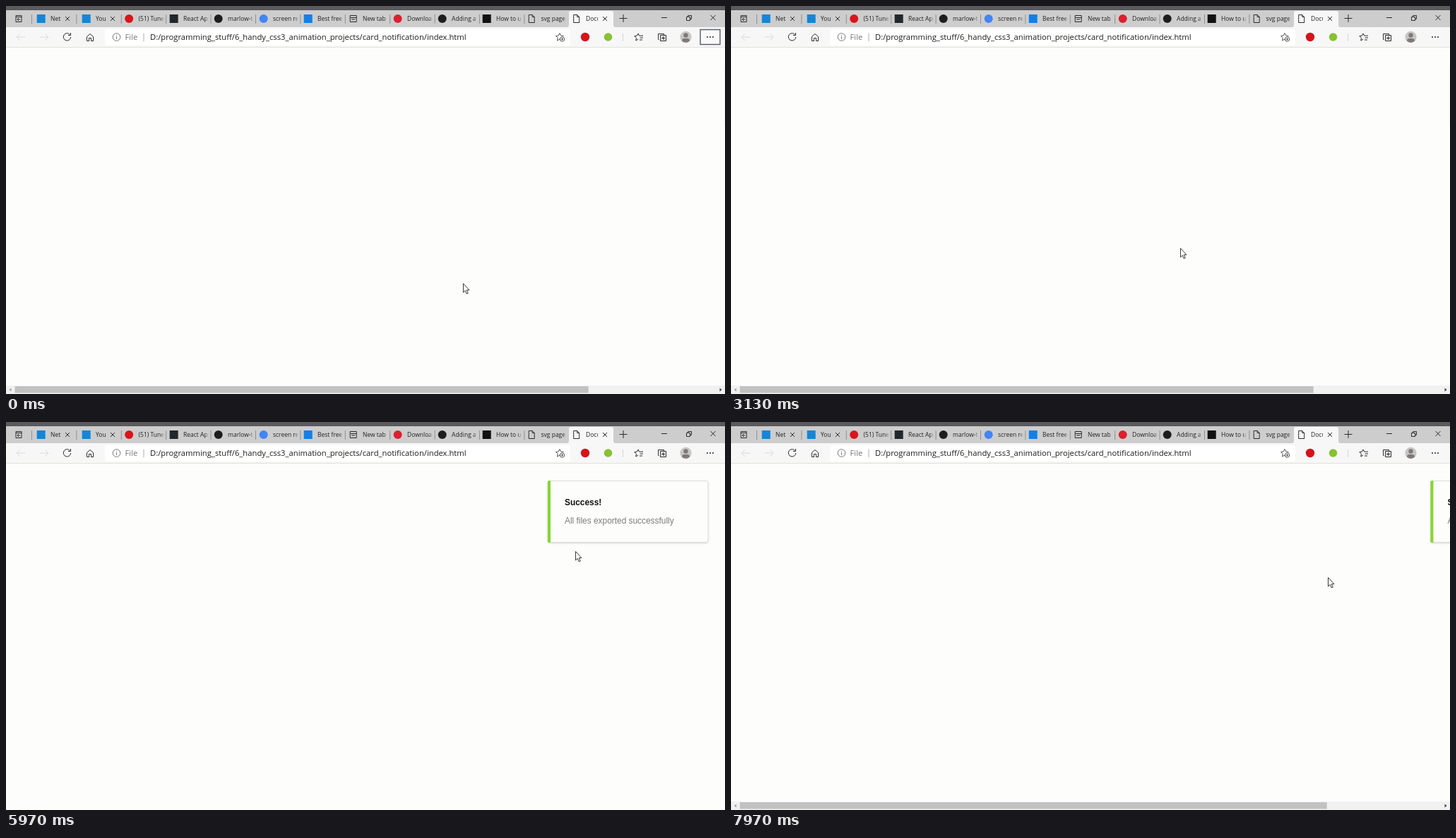
An HTML page for the animation above (8 s loop, 1018 by 550 pixels).

```html
<!DOCTYPE html>
<html lang="en">
<head>
<meta charset="utf-8">
<title>Card notification</title>
<style>
  html, body { margin: 0; width: 100%; height: 100%; overflow: hidden; background: #fdfdfc; }
  svg { display: block; }
  .ui { font: 11.24px "Open Sans", "Noto Sans", sans-serif; fill: #1c1c1c; }
  .tab { font-size: 8.5px; fill: #222; }
  .card { font: 11.9px "Liberation Sans", Arial, sans-serif; }
  .line { fill: none; stroke: #2b2b2b; stroke-width: 1; }
</style>
</head>
<body>
<svg id="stage" width="1018" height="550" viewBox="0 0 1018 550">
  <defs>
    <linearGradient id="fade">
      <stop offset="0" stop-color="#cdcdce" stop-opacity="0"/>
      <stop offset="1" stop-color="#cdcdce"/>
    </linearGradient>
    <filter id="shadow" x="-5%" y="-10%" width="110%" height="125%">
      <feDropShadow dx="0" dy="1" stdDeviation="1" flood-opacity=".16"/>
    </filter>
  </defs>
  <rect width="1018" height="550" fill="#fdfdfc"/>

  <g id="card" class="card">
    <rect x="767" y="83.5" width="227" height="87" rx="2.5" fill="#fdfdfc" stroke="#dcdcdc" filter="url(#shadow)"/>
    <path d="M771 83H769Q767 83 767 85V169Q767 171 769 171H771Z" fill="#84d72f"/>
    <text x="791" y="118" font-weight="bold" fill="#111">Success!</text>
    <text x="791" y="143.5" fill="#7c7c7c">All files exported successfully</text>
  </g>

  <g id="scrollbar">
    <rect y="538" width="1018" height="12" fill="#f1f1f1"/>
    <rect id="thumb" x="12.5" y="539" height="9.5" fill="#c1c1c1"/>
    <path d="M7.5 541.5V546.5L4.5 544Z" fill="#a0a0a0"/>
    <path d="M1010.5 541.5V546.5L1013.5 544Z" fill="#454545"/>
  </g>

  <g class="ui">
    <rect width="1018" height="31" fill="#cdcdce"/>
    <rect width="1018" height="6" fill="#5b595b"/>
    <rect y="30" width="1018" height="28" fill="#f7f7f7"/>
    <rect y="58" width="1018" height="1" fill="#e1e0d9"/>
    <path d="M794 30Q797 30 797 27V10Q797 7 800 7H857Q860 7 860 10V27Q860 30 863 30Z" fill="#f7f7f7"/>
    <path class="line" d="M14 13.5H22V22.5H14ZM14 15.5H22M16 19H20M18 17L16 19L18 21" stroke-width="1.3"/>
    <g id="tabs"></g>
    <path class="line" d="M868.5 17.5H879.5M874 12V23M928 16.5H936M963.5 15.5H968.5V20.5H963.5ZM965.5 15V13.5H970.5V18.5H969M997.5 13L1004.5 20M1004.5 13L997.5 20"/>

    <rect x="140" y="33" width="659" height="23" rx="3" fill="#fff"/>
    <rect id="reloadHover" x="72" y="33" width="29" height="23" rx="2" fill="#d9d9d9"/>
    <path class="line" style="stroke:#d8d8d8" d="M27 44H15M20 39L15 44L20 49M48 44H60M55 39L60 44L55 49"/>
    <path class="line" stroke-width="1.2" d="M90.5 40.5A5.2 5.2 0 1 0 91.7 44M91.5 38V41.5H88"/>
    <path class="line" d="M114.5 43.5L119 39.5L123.5 43.5V49.5H120.5V45.5H117.5V49.5H114.5Z"/>
    <g class="line" style="stroke:#777">
      <circle cx="156.5" cy="44" r="5.3"/>
      <path d="M156.5 43V47M156.5 41V42"/>
    </g>
    <text x="168.5" y="48" fill="#777" style="fill:#777">File</text>
    <path d="M195 38.5V50" stroke="#aaa"/>
    <text x="204" y="48">D:/programming_stuff/6_handy_css3_animation_projects/card_notification/index.html</text>
    <g class="line" style="stroke:#555">
      <path d="M784 47L780.5 49L781.3 45L778.5 42.5L782 42L784 38.5L785.8 42L789.5 42.5"/>
      <circle cx="787.5" cy="47" r="3.2"/>
      <path d="M785.7 47H789.3M787.5 45.2V48.8"/>
    </g>
    <circle cx="820" cy="44" r="6.2" fill="#d4131b"/>
    <circle cx="852.5" cy="44" r="5.8" fill="#86c232"/>
    <path d="M873.5 39V50" stroke="#cfd3e2"/>
    <path class="line" d="M895 47L891.8 49L892.5 45.2L889.8 42.7L893.4 42.1L895 39L896.6 42.1H902M897.5 45H902M897 48H901"/>
    <path class="line" d="M926.5 41.5H934.5V49.5H926.5ZM924.5 47.5H923.5V39.5H931.5V41M928 45.5H933M930.5 43V48"/>
    <circle cx="962.5" cy="44" r="8.2" fill="#c9c7c5"/>
    <circle cx="962.5" cy="41.5" r="3.2" fill="#7d7a78"/>
    <path d="M957 49.5Q957 46 960 46H965Q968 46 968 49.5Q962.5 54 957 49.5Z" fill="#7d7a78"/>
    <rect id="menuFocus" x="983" y="33.5" width="28" height="21" fill="#f9f9fa" stroke="#555a6c" stroke-width="1.4"/>
    <g fill="#222"><circle cx="993" cy="44" r="1"/><circle cx="997" cy="44" r="1"/><circle cx="1001" cy="44" r="1"/></g>
  </g>

  <path id="cursor" d="M.5 .5V13L3.3 10.4L5.2 15L7.2 14.1L5.3 9.7H9Z" fill="#fff" stroke="#222" stroke-width=".9"/>
</svg>

<script>
const LOOP = 8000, STAGE_WIDTH = 1018, TRACK = 994;
const CARD_RIGHT = 994, CARD_TRAVEL = 252;
const SLIDE = 500, ENTER = 3138, EXIT = 7670;
const MENU_BLUR = 2100, OVERFLOW_CLEARED = 4545;

const byId = id => document.getElementById(id);
const clamp = v => Math.min(1, Math.max(0, v));
const show = (id, visible) => byId(id).setAttribute('display', visible ? 'inline' : 'none');

// Tab: [label, text x, icon shape, icon colour]
const tabs = [
  ['Net', 63, 'square', '#1286d8'], ['You', 127, 'square', '#1286d8'],
  ['(51) Tune:', 187.5, 'circle', '#d9141c'], ['React App', 251, 'square', '#20282c'],
  ['marlow-t', 314, 'circle', '#1d1d1f'], ['screen rea', 378, 'circle', '#4285f4'],
  ['Best free', 441, 'square', '#1180ea'], ['New tab', 505, 'window'],
  ['Download', 568, 'circle', '#dc2030'], ['Adding a', 631, 'circle', '#1d1d1f'],
  ['How to us', 694, 'square', '#111'], ['svg page', 757.5, 'page'],
  ['Document', 821, 'page']
];
const icons = {
  square: (x, c) => `<rect x="${x - 6}" y="12" width="12" height="12" fill="${c}"/>`,
  circle: (x, c) => `<circle cx="${x}" cy="18" r="6" fill="${c}"/>`,
  window: x => `<path class="line" d="M${x - 4.5} 13.5h9v9h-9zm0 3h9m-7 2.5h5"/>`,
  page: x => `<path class="line" d="M${x - 4} 12.5h5l3 3v8h-8zm5 0v3h3"/>`
};
byId('tabs').innerHTML = tabs.map(([label, x, icon, color], i) => {
  const active = i === tabs.length - 1, closable = i < 2 || active;
  const width = closable ? 17 : 36;
  const edge = 36.5 + 63.4 * i, closeX = x + (active ? 24 : 21);
  return (active ? '' : `<path d="M${edge} 12V25" stroke="#8f8f90"/>`) +
    icons[icon](x - 13.3, color) +
    `<svg x="${x}" y="8" width="${width}" height="22">
      <text class="tab" y="13">${label}</text>
      ${closable ? '' : `<rect x="${width - 5}" width="5" height="22" fill="url(#fade)"/>`}
    </svg>` +
    (closable ? `<path class="line" d="M${closeX} 15l6 6m0-6l-6 6" stroke-width="1.2"/>` : '');
}).join('');

// CSS "ease": cubic-bezier(.25, .1, .25, 1)
function ease(p) {
  const bezier = (a, b, u) => 3 * a * u * (1 - u) ** 2 + 3 * b * u * u * (1 - u) + u ** 3;
  let lo = 0, hi = 1;
  for (let i = 0; i < 24; i++) {
    const mid = (lo + hi) / 2;
    if (bezier(.25, .25, mid) < p) lo = mid; else hi = mid;
  }
  return bezier(.1, 1, lo);
}

// Pointer stops: [time, x, y]
const stops = [
  [30, 647, 393], [1050, 89, 46], [2500, 89, 46], [2980, 636, 343],
  [4530, 636, 343], [4970, 749, 269], [5200, 749, 268], [5740, 769, 241],
  [5870, 769, 241], [6070, 842, 126], [6410, 842, 126], [6790, 843, 225],
  [6900, 844, 222], [7590, 844, 222], [7650, 845, 220]
];
function pointerAt(t) {
  const next = stops.findIndex(s => s[0] > t);
  if (next === 0) return stops[0].slice(1);
  if (next < 0) return stops.at(-1).slice(1);
  const [t0, x0, y0] = stops[next - 1], [t1, x1, y1] = stops[next];
  const p = (t - t0) / (t1 - t0), k = p * p * (3 - 2 * p);
  return [x0 + (x1 - x0) * k, y0 + (y1 - y0) * k].map(Math.round);
}

function cardShift(t) {
  return CARD_TRAVEL * (1 - ease(clamp((t - ENTER) / SLIDE)) + ease(clamp((t - EXIT) / SLIDE)));
}

function draw(t) {
  const shift = cardShift(t);
  byId('card').setAttribute('transform', `translate(${shift} 0)`);

  // The scrollbar keeps its old length until the pointer moves again.
  const contentWidth = CARD_RIGHT + (t < OVERFLOW_CLEARED ? CARD_TRAVEL : shift);
  show('scrollbar', contentWidth > STAGE_WIDTH);
  byId('thumb').setAttribute('width', TRACK * Math.min(1, STAGE_WIDTH / contentWidth));

  const [x, y] = pointerAt(t);
  byId('cursor').setAttribute('transform', `translate(${x} ${y})`);
  show('reloadHover', x >= 72 && x <= 101 && y >= 33 && y <= 56);
  show('menuFocus', t < MENU_BLUR);
}

const start = performance.now();
function tick() {
  draw((performance.now() - start) % LOOP);
  requestAnimationFrame(tick);
}
tick();
</script>
</body>
</html>
```
